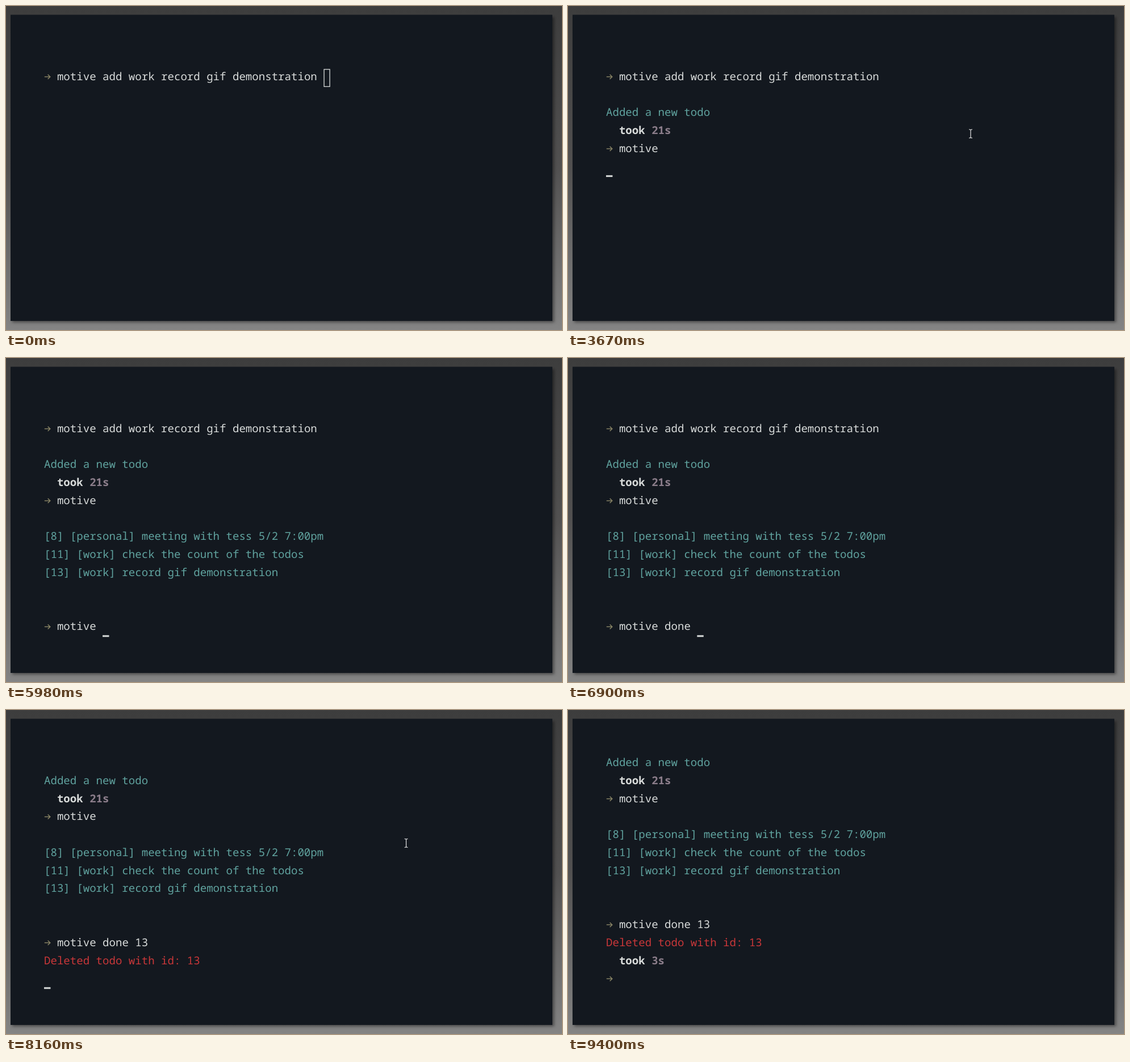
Animation, 979 px wide and 572 px high, one loop 9.68 s. Source, as an HTML page with a canvas:

```html
<!DOCTYPE html>
<html lang="en">
<head>
<meta charset="utf-8">
<title>Terminal todo demo</title>
<style>
  html, body { margin: 0; width: 100%; height: 100%; overflow: hidden; background: #3e3e3e; }
  canvas { display: block; }
</style>
</head>
<body>
<canvas id="stage" width="979" height="572"></canvas>
<script>
const ctx = document.getElementById('stage').getContext('2d');
const LOOP = 9680;
const LEFT = 67, TOP = 79.4, COL = 11.45, ROW = 31.77, LAST_ROW = 12;
const FONT = '19.08px "Noto Sans Mono", "DejaVu Sans Mono", monospace';
const WHITE = '#d9dcdb', TEAL = '#60a39f', RED = '#c93739', MAUVE = '#8b7d8a', OLIVE = '#8d8868';
const FOCUS = 330, KEY_IDLE = 590, POINTER_IDLE = 500, POINTER_STEP = 40;

// The terminal is a stream of text, printed at once or typed evenly up to a time.
const print = (at, text, color = WHITE, bold = false) => ({ at, text, color, bold, end: at });
const type = (at, end, text) => ({ at, end, text, color: WHITE, bold: false });
const prompt = at => print(at, '→ ', OLIVE);
const took = (at, time) => [print(at, '  took ', WHITE, true), print(at, time + '\n', MAUVE, true)];

const session = [
  print(0, '\n'), prompt(0), print(0, 'motive add work record gif demonstration '),
  print(1650, '\n'),
  print(2740, '\nAdded a new todo\n', TEAL), ...took(2800, '21s'), prompt(2860),
  type(3130, 3520, 'motive'), print(3670, '\n'),
  print(4740, '\n[8] [personal] meeting with tess 5/2 7:00pm\n' +
    '[11] [work] check the count of the todos\n' +
    '[13] [work] record gif demonstration\n\n', TEAL),
  print(4790, '\n'), prompt(4790),
  type(5230, 5730, 'motive '), type(6510, 6980, 'done 13'), print(7150, '\n'),
  print(8160, 'Deleted todo with id: 13\n', RED), ...took(8210, '3s'), prompt(8210)
];

const linear = k => k;
const smooth = k => k * k * (3 - 2 * k);

// Pointer strokes; the pointer rests after each one until it is hidden.
const strokes = [
  { at: 330, end: 420, from: [472.5, 538.5], to: [713.5, 201.5], ease: linear },
  { at: 580, end: 740, from: [715.5, 204], to: [709, 225.5], ease: smooth, hide: 5980 },
  { at: 8110, end: 8570, from: [704.6, 232], to: [703.5, 384.5], ease: smooth },
  { at: 8800, end: 8880, from: [702, 393], to: [654.5, 558], ease: linear, hide: 8920 }
];

function pointerAt(t) {
  const s = strokes.findLast(stroke => t >= stroke.at);
  if (!s || t >= s.hide) return null;
  const steps = Math.ceil((s.end - s.at) / POINTER_STEP);
  const k = Math.min(1, Math.floor((t - s.at) / (s.end - s.at) * steps + 0.001) / steps);
  return s.from.map((a, i) => a + (s.to[i] - a) * s.ease(k));
}

function shown({ at, end, text }, t) {
  if (t >= end) return text;
  return text.slice(0, 1 + Math.floor((t - at) / (end - at) * (text.length - 1) + 0.001));
}

// Splits the stream into positioned runs and finds the cursor after the last one.
function layout(t) {
  const runs = [];
  let line = 0, col = 0;
  for (const item of session) {
    if (t < item.at) break;
    shown(item, t).split('\n').forEach((text, i) => {
      if (i) { line++; col = 0; }
      if (text) runs.push({ ...item, text, line, col });
      col += text.length;
    });
  }
  return { runs, line, col, scroll: Math.max(0, line - LAST_ROW) };
}

// The cursor goes dark once neither keys, output nor pointer have moved for a while.
function cursorLit(t) {
  const recent = (list, idle) =>
    list.some(({ at, end }) => t >= at && t < end + idle);
  return t < FOCUS || recent(session.filter(s => s.at > 0), KEY_IDLE) || recent(strokes, POINTER_IDLE);
}

function path(color, width, ...points) {
  ctx.strokeStyle = color;
  ctx.lineWidth = width;
  ctx.beginPath();
  points.forEach(([x, y]) => ctx.lineTo(x, y));
  ctx.stroke();
}

function drawWindow() {
  const wall = ctx.createLinearGradient(0, 0, 0, 572);
  wall.addColorStop(0, '#3d3d3d');
  wall.addColorStop(0.5, '#525151');
  wall.addColorStop(1, '#848484');
  ctx.fillStyle = wall;
  ctx.fillRect(0, 0, 979, 572);
  ctx.save();
  ctx.shadowColor = 'rgba(0, 0, 0, 0.45)';
  ctx.shadowBlur = 5;
  ctx.shadowOffsetX = ctx.shadowOffsetY = 3;
  ctx.fillStyle = '#13181f';
  ctx.fillRect(8, 15.5, 954, 540.5);
  ctx.restore();
}

function drawArrow(x, y) {
  path(OLIVE, 1.4, [x + 0.8, y], [x + 10.6, y]);
  path(OLIVE, 1.4, [x + 6.7, y - 4], [x + 10.8, y], [x + 6.7, y + 4]);
}

function drawCursor(x, y, focused) {
  if (focused) {
    ctx.fillStyle = WHITE;
    ctx.fillRect(x, y + ROW - 3, COL, 3);
  } else {
    ctx.strokeStyle = WHITE;
    ctx.lineWidth = 1.3;
    ctx.strokeRect(x + 0.7, y + 0.7, COL - 1.4, ROW - 1.4);
  }
}

function drawPointer(x, y) {
  path('#e8e8e8', 1.2, [x, y - 7], [x, y + 7]);
  for (const side of [-7.6, 7.6]) {
    path('#e8e8e8', 1.1, [x - 2.8, y + side], [x, y + side * 0.92], [x + 2.8, y + side]);
  }
}

function draw(t) {
  const { runs, line, col, scroll } = layout(t);
  const left = c => LEFT + c * COL;
  const top = l => TOP + (l - scroll) * ROW;

  drawWindow();
  for (const run of runs) {
    if (run.line < scroll) continue;
    const x = left(run.col), y = top(run.line);
    if (run.text === '→ ') {
      drawArrow(x, y + 13.8);
    } else {
      ctx.font = (run.bold ? 'bold ' : '') + FONT;
      ctx.fillStyle = run.color;
      ctx.fillText(run.text, x, y + 19.7);
    }
  }

  if (cursorLit(t)) drawCursor(left(col), top(line), t >= FOCUS);
  const pointer = pointerAt(t);
  if (pointer) drawPointer(...pointer);
}

ctx.textRendering = 'geometricPrecision';
const start = performance.now();
function tick() {
  draw((performance.now() - start) % LOOP);
  requestAnimationFrame(tick);
}
tick();
</script>
</body>
</html>
```
